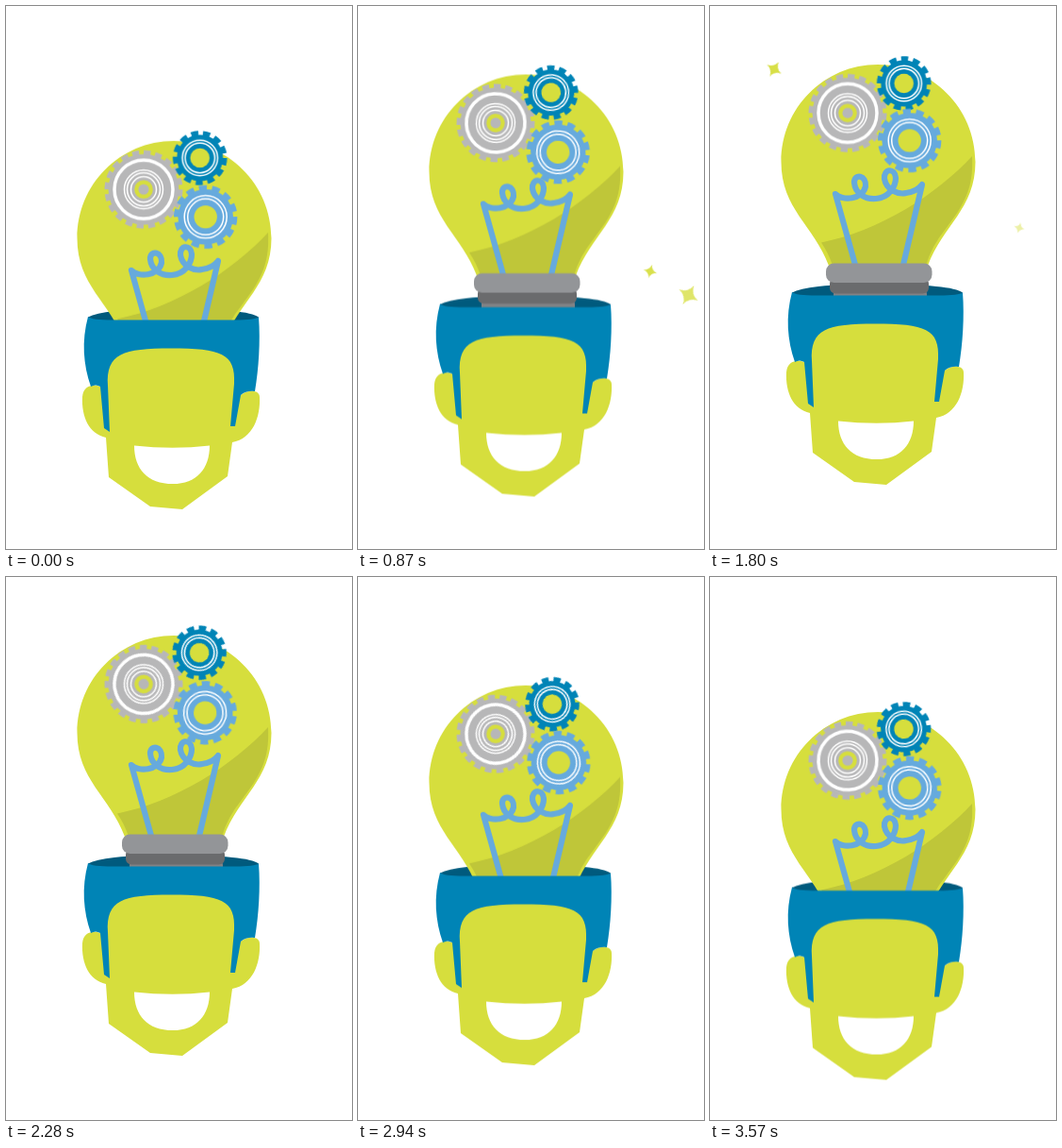
Write an HTML page that moves like this. It is 367 px wide and 575 px high and loops after 3600 ms.

```html
<!DOCTYPE html>
<html lang="en">
<head>
<meta charset="utf-8">
<title>Bright idea</title>
<style>
  :root { --lime: #d6de3d; --blue: #0084b6; --navy: #005a7d; --sky: #66aadd; --gray: #b7b7b8; --loop: 3600ms; }
  html, body { margin: 0; width: 100%; height: 100%; overflow: hidden; background: #fff; }
  svg { display: block; width: 100%; height: 100%; }
  .lime { fill: var(--lime); }
  .line { fill: none; stroke: #fff; stroke-width: 1.5; }

  .head { animation: head var(--loop) infinite; }
  .bulb { animation: bulb var(--loop) infinite; }
  @keyframes head {
    0% { transform: translateY(0); animation-timing-function: cubic-bezier(.364, 0, .636, 1); }
    47.2% { transform: translateY(-26px); }
    69.4% { transform: translateY(-26px); animation-timing-function: cubic-bezier(.3, .2, .7, .8); }
    100% { transform: translateY(0); }
  }
  @keyframes bulb {
    0% { transform: translateY(81px); animation-timing-function: cubic-bezier(.333, 1, .667, 1); }
    49% { transform: translateY(0); }
    69% { transform: translateY(0); animation-timing-function: cubic-bezier(.333, .667, .667, 1); }
    100% { transform: translateY(81px); }
  }

  .gear { animation: spin var(--loop) linear infinite; }
  .gear .body { fill: var(--c); }
  .gear .teeth { fill: none; stroke: var(--c); stroke-width: 6; stroke-dasharray: 1.2 .8; }
  @keyframes spin { to { transform: rotate(var(--turn)); } }

  .star { fill: var(--lime); opacity: 0; animation: star var(--loop) linear infinite; }
  @keyframes star {
    0% { opacity: 0; transform: translateY(20px) rotate(-8deg) scale(.75); animation-timing-function: ease-out; }
    2% { opacity: .45; }
    9% { opacity: 1; transform: translateY(2px) rotate(8deg) scale(1); }
    14.5% { opacity: .95; transform: translateY(0) rotate(14deg) scale(.65); }
    20% { opacity: .7; transform: translateY(0) rotate(16deg) scale(.5); }
    25%, 100% { opacity: 0; transform: translateY(0) rotate(18deg) scale(.3); }
  }
</style>
</head>
<body>
<svg viewBox="0 0 367 575" preserveAspectRatio="none">
  <defs>
    <path id="spark" d="M0-1Q.16-.16 1 0Q.16.16 0 1Q-.16.16-1 0Q-.16-.16 0-1Z"/>
  </defs>

  <g class="head">
    <path fill="var(--navy)" d="M87 329.5Q95 325 115 323C150 319 205 319 240 323Q262 325 268 329.5L262 340H92Z"/>
  </g>

  <g class="bulb">
    <path class="lime" d="M178 62C121 62 75.5 108 75.5 165C75.5 215 110 232 126 275H231C247 232 281.5 215 281.5 165C281.5 108 235 62 178 62Z"/>
    <path fill="#bfc639" d="M278 159C240 200 180 238 118 250.5Q126 262 130 275H229Q235 254 250 236C268 212 280 195 278 159Z"/>
    <path fill="none" stroke="var(--sky)" stroke-width="6.2" stroke-linejoin="round"
      d="M154 274L133 199C140 207 162 205 165 191C166 179 153 177 153 187C154 199 165 205 176 204C190 203 197 191 197 182C196 171 184 172 185 183C187 195 200 200 208 198C216 197 222 193 225 189L205 274"/>
    <rect x="131" y="300" width="99" height="18" rx="5" fill="#808285"/>
    <rect x="127" y="288" width="105" height="16.5" rx="6" fill="#6a6b6d"/>
    <rect x="123" y="272.5" width="112.5" height="20.5" rx="8.5" fill="#939598"/>

    <g transform="translate(146 113.4)">
      <g class="gear" style="--c: var(--gray); --turn: 360deg">
        <circle class="teeth" r="38.5" pathLength="40"/>
        <circle class="body" r="37.5"/>
        <circle class="line" r="31" style="stroke-width: 3.5"/>
        <circle class="line" r="20.5"/>
        <circle class="line" r="17.5"/>
        <circle class="line" r="13.5"/>
        <circle class="lime" r="9.8"/>
        <circle class="body" r="5.6"/>
      </g>
    </g>
    <g transform="translate(205.7 81)">
      <g class="gear" style="--c: var(--blue); --turn: 1080deg">
        <g transform="translate(0 -1)">
          <circle class="teeth" r="25.8" pathLength="26"/>
          <circle class="body" r="24.5"/>
          <circle class="line" r="18.7"/>
          <circle class="line" r="15.7"/>
          <circle class="lime" r="10.3"/>
        </g>
      </g>
    </g>
    <g transform="translate(212 143.4)">
      <g class="gear" style="--c: var(--sky); --turn: -720deg">
        <g transform="translate(-.3 -.9)">
          <circle class="teeth" r="30.7" pathLength="28"/>
          <circle class="body" r="29.3"/>
          <circle class="line" r="22.5"/>
          <circle class="line" r="19"/>
          <circle class="lime" r="12.2"/>
        </g>
      </g>
    </g>
  </g>

  <g class="head">
    <path class="lime" d="M100 403C92 400 82 402 81 414C80 435 88 453 106 457L109 499L153 530L187 533L235 498L240 462C262 458 270 435 269 414C269 406 256 406 249 412V350H100Z"/>
    <path fill="var(--blue)" d="M87 329Q91 332.5 113 332.5H243Q264 332.5 268 329.5C270 355 268 385 264 408Q255 407 249 412L243 445H238L242 400C244 368 228 362.5 175 362.5C124 362.5 106 368 108 402L110 451L104 447L100 403Q95 400 90 403C82 380 80 355 87 329Z"/>
    <path fill="#fff" d="M136 465.4Q177 470 216 465.4C216 490 202 506 177 506C150 506 136 490 136 465.4Z"/>
  </g>

  <g transform="translate(310 281)"><g class="star" style="animation-delay: 330ms"><use href="#spark" transform="scale(11.5)"/></g></g>
  <g transform="translate(350.5 301.5)"><g class="star" style="animation-delay: 650ms"><use href="#spark" transform="rotate(25) scale(12)"/></g></g>
  <g transform="translate(58 125)"><g class="star" style="animation-delay: 870ms"><use href="#spark" transform="rotate(25) scale(12.5)"/></g></g>
  <g transform="translate(328 235)"><g class="star" style="animation-delay: 1020ms"><use href="#spark" transform="scale(13.5)"/></g></g>
  <g transform="translate(68 67)"><g class="star" style="animation-delay: 1280ms"><use href="#spark" transform="rotate(18) scale(14)"/></g></g>
</svg>
</body>
</html>
```
